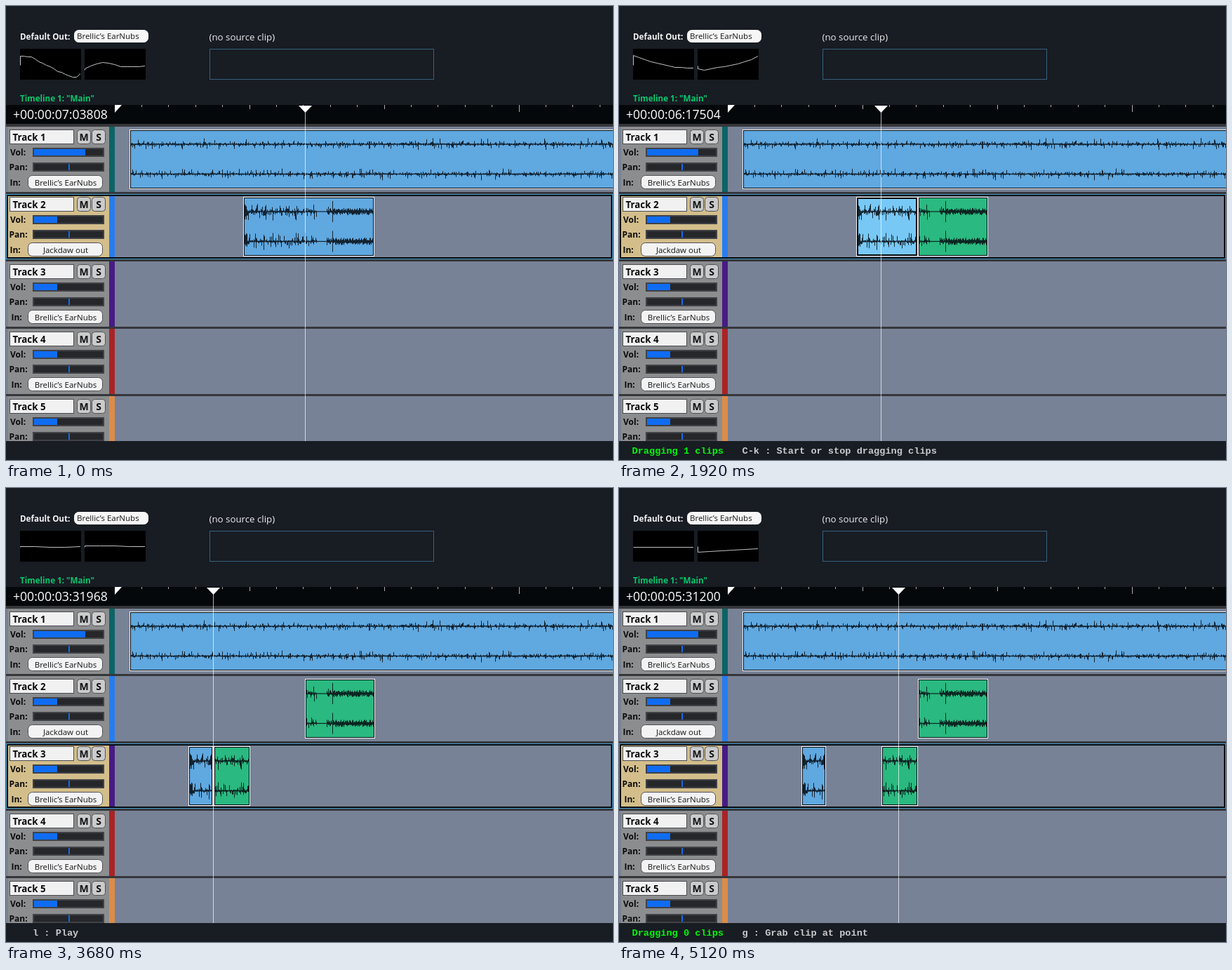
Write an HTML page with a canvas that moves like this. It is 865 by 647 pixels and loops after 5600 ms.

```html
<!DOCTYPE html>
<html lang="en">
<head>
<meta charset="utf-8">
<title>Audio timeline</title>
<style>
html, body { margin: 0; width: 100%; height: 100%; overflow: hidden; background: #181c23; }
canvas { display: block; width: 865px; height: 647px; }
</style>
</head>
<body>
<canvas id="stage" width="865" height="647"></canvas>
<script>
const LOOP = 5600, RATE = 48000, SAMPLES_PER_PX = 1250, ORIGIN = 155, FLOOR = 620;
const ctx = document.getElementById('stage').getContext('2d');
const SANS = '"Open Sans", "Noto Sans", sans-serif';
const MONO = '"Liberation Mono", monospace';
const DEVICE = 'Brellic’s EarNubs';
const BACK = '#181c23';

const tints = {
  blue: ['#60a8e0', '#78c8f6'],
  green: ['#2ab980', '#3adf9c']
};
const tracks = [
  { strip: '#0c6466', vol: 73, input: DEVICE },
  { strip: '#267df0', vol: 33, input: 'Jackdaw out' },
  { strip: '#471b84', vol: 33, input: DEVICE },
  { strip: '#a92426', vol: 33, input: DEVICE },
  { strip: '#dd8c48', vol: 33, input: DEVICE }
];

// Evenly spaced heights of the two output scopes.
const scopes = {
  idle: [[23, 10, 10, 11, 11, 14, 18, 20, 23, 25, 28, 32, 33, 36, 38, 40, 40, 35],
         [30, 28, 24, 21, 19, 20, 22, 25, 25, 25, 25, 24]],
  rewind: [[23, 9, 12, 15, 18, 20, 22, 24, 26, 26, 27, 27],
           [24, 28, 30, 28, 26, 25, 23, 21, 18, 15, 10]],
  quiet: [[22, 21, 21, 22, 22, 22], [21, 22, 22, 22, 21, 21]],
  calm: [[23, 22, 22, 23, 23, 22], [23, 21, 21, 21, 22, 22]],
  play: [[23, 20, 19, 19, 18, 17, 16], [21, 26, 26, 26, 25, 25, 24]],
  end: [[23, 23, 23, 23], [22, 30, 29, 28, 27, 26, 25]]
};

const CUT = 'S-c : Cut clip at point';
const DRAG = 'C-k : Start or stop dragging clips';
const REWIND = 'j : Rewind', PAUSE = 'k : Pause', PLAY = 'l : Play';

// head: playhead in samples; code: timecode, which lags one step behind.
const steps = [
  { t: 0, head: 339808, code: 339808, cuts: 0, row: 1, lead: 338, mid: 296, held: '', drag: '', status: '', scope: 'idle' },
  { t: 320, status: CUT },
  { t: 1120, cuts: 1 },
  { t: 1280, status: REWIND },
  { t: 1440, head: 305504, scope: 'rewind' },
  { t: 1600, head: 273200, code: 305504 },
  { t: 1760, status: PAUSE },
  { t: 1920, status: DRAG, drag: '1', held: 'lead' },
  { t: 2080, status: 'f : Move track selector down', row: 2, code: 273200 },
  { t: 2240, status: REWIND, head: 240480, scope: 'quiet' },
  { t: 2400, code: 240480 },
  { t: 2560, head: 208224 },
  { t: 2720, head: 175968, code: 208224, scope: 'calm' },
  { t: 2880, status: PAUSE },
  { t: 3040, status: CUT, drag: '', cuts: 2 },
  { t: 3360, status: DRAG, drag: '0', held: '', code: 175968 },
  { t: 3680, status: PLAY, drag: '' },
  { t: 3840, head: 206900, scope: 'play' },
  { t: 4000, status: PAUSE },
  { t: 4320, status: DRAG, drag: '1', held: 'mid' },
  { t: 4480, head: 239156, code: 206900 },
  { t: 4640, head: 271200, code: 239156, scope: 'end' },
  { t: 4800, head: 303800, code: 271200 },
  { t: 5120, status: 'g : Grab clip at point', drag: '0', held: '' }
];

// A held clip travels with the playhead.
const states = [];
for (const step of steps) {
  const prev = states[states.length - 1] || {};
  const s = { ...prev, ...step };
  if (s.held && s.held === prev.held) s[s.held] += (s.head - prev.head) / SAMPLES_PER_PX;
  states.push(s);
}

function box(x, y, w, h, color) {
  ctx.fillStyle = color;
  ctx.fillRect(x, y, w, h);
}

function frame(x, y, w, h, color, width = 1) {
  ctx.lineWidth = width;
  ctx.strokeStyle = color;
  ctx.strokeRect(x, y, w, h);
}

function pill(x, y, w, h, r, fill, line) {
  ctx.beginPath();
  ctx.roundRect(x + .5, y + .5, w - 1, h - 1, r);
  ctx.fillStyle = fill;
  ctx.fill();
  ctx.strokeStyle = line;
  ctx.lineWidth = 1;
  ctx.stroke();
}

function label(str, x, y, font, color, align = 'left') {
  ctx.font = font;
  ctx.fillStyle = color;
  ctx.textAlign = align;
  ctx.fillText(str, x, y);
}

function triangle(color, ...points) {
  ctx.beginPath();
  for (const [x, y] of points) ctx.lineTo(x, y);
  ctx.fillStyle = color;
  ctx.fill();
}

function hash(n) {
  const v = Math.sin(n * 127.1 + 3.7) * 43758.5453;
  return v - Math.floor(v);
}

function musicLevel(u, seed) {
  const h = hash(u + seed);
  const beat = Math.sin(u * .31) ** 4;
  return .6 + (1 + 3 * beat) * h * h + 5 * h ** 18;
}

function speechLevel(u, seed) {
  const h = hash(u + seed);
  if (u < 6) return 3 + 9 * h;
  if (u < 105) return .7 + (2 + 4 * Math.sin(u * .27) ** 2) * h * h + 7 * h ** 8;
  if (u < 119) return .6;
  if (u < 127) return 1 + 6 * h * h;
  if (u < 128) return 15;
  return 1.2 + 4 * h;
}

function wave(x, y, from, to, level) {
  ctx.fillStyle = 'rgba(5,12,18,.85)';
  [25, 67.5].forEach((center, channel) => {
    for (let u = from + 2; u < to - 2; u++) {
      const up = level(u, channel * 1000);
      const down = level(u, channel * 1000 + 400);
      ctx.fillRect(x + u - from, y + center - up, 1, up + down);
    }
  });
}

function clip(row, left, from, to, tint, held, level = speechLevel) {
  const x = Math.round(left), y = 172 + row * 96, w = to - from;
  const edge = held ? 3 : 2;
  box(x, y + 4, w, 85, '#f4f6f8');
  box(x + 1, y + 5, w - 2, 83, '#05090c');
  box(x + edge, y + 4 + edge, w - 2 * edge, 85 - 2 * edge, tints[tint][held ? 1 : 0]);
  wave(x, y, from, to, level);
}

function slider(y) {
  box(38, y, 102, 13, '#404247');
  box(40, y + 2, 98, 9, '#25272a');
}

function track(i, selected) {
  const { strip, vol, input } = tracks[i], y = 172 + i * 96;
  const bold = `bold 12px ${SANS}`;
  box(0, y, 865, 93, '#788296');
  box(3, y, 144, 93, selected ? '#d3be8b' : '#8c8d8e');
  box(147, y, 8, 93, strip);
  if (selected) {
    frame(2, y + 2, 861, 89, '#05080b', 2);
    frame(.5, y + .5, 864, 92, '#4ba3d2');
  }
  box(5, y + 4, 92, 21, '#4a4c50');
  box(6, y + 5, 90, 19, '#f1f1f2');
  label(`Track ${i + 1}`, 9.5, y + 19.5, `bold 13.3px ${SANS}`, '#0b0b0c');
  [['M', 101], ['S', 122]].forEach(([name, x]) => {
    pill(x, y + 4, 20, 21, 4, '#cbcbcc', '#505256');
    label(name, x + 10, y + 19.5, `bold 14px ${SANS}`, '#101112', 'center');
  });
  label('Vol:', 6, y + 40.5, bold, '#0b0b0c');
  slider(y + 30);
  box(40, y + 32, vol, 9, '#0f6cf2');
  label('Pan:', 4.5, y + 62, bold, '#0b0b0c');
  slider(y + 51);
  box(89, y + 53, 2, 9, '#0f6cf2');
  label('In:', i < 2 ? 5.5 : 7.5, y + 83.5, bold, '#0b0b0c');
  pill(31, y + 69, 107, 20, 6, '#f3f3f4', '#505256');
  label(input, 85, y + 83.5, `11.5px ${SANS}`, '#141516', 'center');
}

function scope(x, heights) {
  box(x, 61, 87, 44, '#000');
  ctx.beginPath();
  const gap = 86 / (heights.length - 2);
  heights.forEach((h, i) => ctx.lineTo(x + Math.max(.5, (i - 1) * gap), 61.5 + h));
  ctx.strokeStyle = '#bfc2c4';
  ctx.lineWidth = 1;
  ctx.stroke();
}

function header(s) {
  label('Default Out:', 20, 48, `bold 11.6px ${SANS}`, '#f2f3f4');
  pill(97, 34, 106, 18, 6, '#f6f6f6', '#f6f6f6');
  label(DEVICE, 101, 47, `11.5px ${SANS}`, '#141516');
  scopes[s.scope].forEach((line, i) => scope(20 + i * 92, line));
  label('(no source clip)', 289.5, 48.5, `13.3px ${SANS}`, '#eceeef');
  frame(290.5, 61.5, 319, 43, '#35617f');
  label('Timeline 1: "Main"', 20, 136, `bold 11.6px ${SANS}`, '#08c96d');
}

function timecode(samples) {
  const pad = (n, size) => String(n).padStart(size, '0');
  return `+00:00:${pad(Math.floor(samples / RATE), 2)}:${pad(samples % RATE, 5)}`;
}

function ruler(s) {
  box(0, 141, 865, 28, '#05080a');
  label(timecode(s.code), 10, 161, `17.6px ${SANS}`, '#fff');
  for (let sec = 1; sec < 19; sec++) {
    const x = Math.floor(ORIGIN + sec * RATE / SAMPLES_PER_PX);
    box(x, 141, 1, sec % 15 === 0 ? 10 : sec % 5 === 0 ? 6 : 3, '#a9acae');
  }
  triangle('#fff', [155, 141], [165, 141], [155, 152]);
}

function clips(s) {
  clip(0, 176, 0, 700, 'blue', false, musicLevel);
  if (!s.cuts) {
    clip(1, s.lead, 0, 187, 'blue', false);
    return;
  }
  clip(1, 426, 88, 188, 'green', false);
  clip(s.row, s.lead, 0, s.cuts === 1 ? 88 : 35, 'blue', s.held === 'lead');
  if (s.cuts === 2) clip(s.row, s.mid, 36, 88, 'green', s.held === 'mid');
}

function playhead(s) {
  const x = Math.floor(ORIGIN + s.head / SAMPLES_PER_PX);
  box(x, 150, 1, FLOOR - 150, 'rgba(255,255,255,.68)');
  triangle('#fff', [x - 9, 142], [x + 10, 142], [x + .5, 152]);
}

function footer(s) {
  const font = `bold 13.6px ${MONO}`;
  box(0, FLOOR, 865, 27, BACK);
  if (s.drag) label(`Dragging ${s.drag} clips`, 18.5, 637.5, font, '#00f808');
  label(s.status, s.drag ? 175.5 : 38, 637.5, font, '#c9cbcd');
}

function draw(s) {
  box(0, 0, 865, 647, BACK);
  header(s);
  ruler(s);
  box(0, 168, 865, FLOOR - 168, '#36373b');
  tracks.forEach((_, i) => track(i, i === s.row));
  clips(s);
  playhead(s);
  footer(s);
}

const start = performance.now();
let shown;
function tick() {
  const t = (performance.now() - start) % LOOP;
  const state = states.findLast(s => s.t <= t);
  if (state !== shown) draw(shown = state);
  requestAnimationFrame(tick);
}
tick();
</script>
</body>
</html>
```
